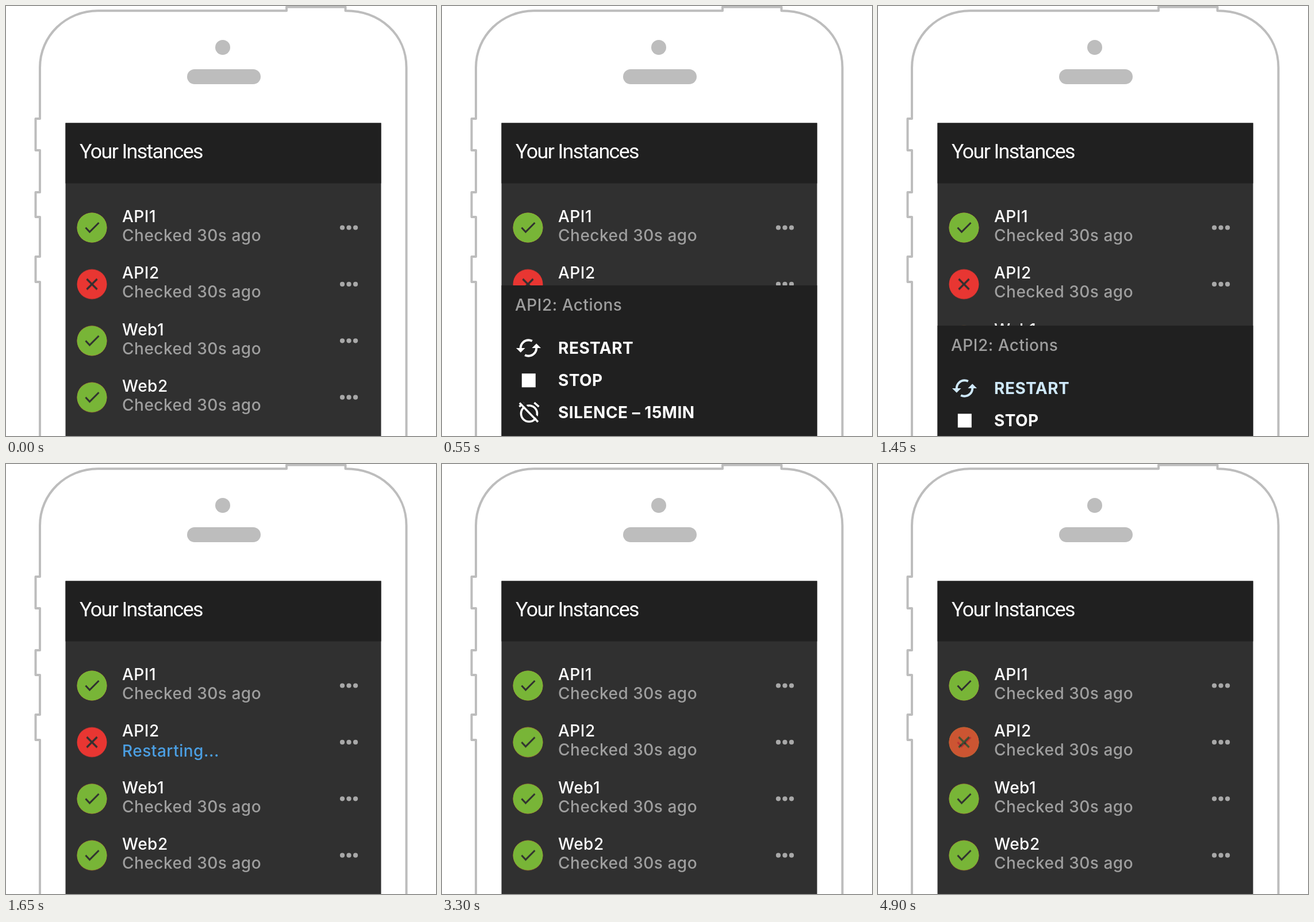
An HTML page with a canvas that plays this animation: 748 px wide and 748 px high, repeating every 4.95 s.

```html
<!DOCTYPE html>
<html lang="en">
<head>
<meta charset="utf-8">
<title>Your Instances</title>
<style>
html, body { margin: 0; width: 100%; height: 100%; overflow: hidden; background: #fff; }
canvas { display: block; width: 100vw; height: 100vh; }
</style>
</head>
<body>
<canvas id="stage" width="748" height="748"></canvas>
<script>
const SIZE = 748, LOOP = 4950, STEP = 50;
const SCREEN = { x: 103.5, y: 203.5, w: 549, h: 545 };
const BODY = '#303030', DARK = '#202020', WHITE = '#fff', GREY = '#9e9e9e';
const LINE = '#bdbdbd', GREEN = '#78b537', RED = '#e83632', BLUE = '#4b9fe3';
const SANS = 'Inter, "Open Sans", sans-serif';
const ROWS = ['API1', 'API2', 'Web1', 'Web2'];
const PANEL_Y = 486, TITLE = 'Your Instances', TITLE_TRACKING = -0.045;

const ctx = document.getElementById('stage').getContext('2d');
const layer = document.createElement('canvas');
layer.width = layer.height = 60;
const layerCtx = layer.getContext('2d');

const mix = (a, b, k) => a + (b - a) * k;
const clamp = v => Math.max(0, Math.min(1, v));

// Progress of a stepped change: 0 before it starts, 1 on its last step.
function stepped(time, start, count) {
  return clamp((Math.floor((time - start) / STEP) + 1) / count);
}

function backOut(t) {
  const s = 1.6, u = t - 1;
  return 1 + u * u * ((s + 1) * u + s);
}

function easeAway(t) {
  return mix(t * t * (3 - 2 * t), t, 0.1);
}

function text(str, x, y, color, weight = 450) {
  ctx.font = `${weight} 28px ${SANS}`;
  ctx.letterSpacing = '0.5px';
  ctx.fillStyle = color;
  ctx.fillText(str, x, y);
}

function dot(c, x, y, r, color) {
  c.fillStyle = color;
  c.beginPath();
  c.arc(x, y, r, 0, Math.PI * 2);
  c.fill();
}

function stroke(c, points, width, color) {
  c.strokeStyle = color;
  c.lineWidth = width;
  c.beginPath();
  points.forEach(([x, y]) => c.lineTo(x, y));
  c.stroke();
}

// The narrowest face at hand, sized to the header.
function pickTitleFont() {
  ctx.letterSpacing = '0px';
  const font = (name, size) => `extra-condensed 400 ${size}px "${name}", sans-serif`;
  const faces = ['Noto Sans', 'Open Sans', 'Roboto'].map(name => {
    ctx.font = font(name, 100);
    return { name, width: ctx.measureText(TITLE).width };
  });
  const best = faces.sort((a, b) => a.width - b.width)[0];
  const size = Math.min(56, 214 / (best.width / 100 + TITLE.length * TITLE_TRACKING));
  return { font: font(best.name, size), spacing: `${TITLE_TRACKING * size}px`, size };
}
const titleFont = pickTitleFont();

function drawPhone() {
  ctx.strokeStyle = LINE;
  ctx.lineWidth = 4;
  ctx.lineJoin = 'round';
  ctx.beginPath();
  ctx.moveTo(59, SIZE + 4);
  for (const [top, bottom] of [[436, 480], [324, 367], [196, 251]]) {
    ctx.lineTo(59, bottom);
    ctx.lineTo(51.5, bottom);
    ctx.lineTo(51.5, top);
    ctx.lineTo(59, top);
  }
  ctx.lineTo(59, 107);
  ctx.bezierCurveTo(59, 52, 104, 8.3, 160, 8.3);
  ctx.lineTo(488, 8.3);
  ctx.lineTo(488, 1.8);
  ctx.lineTo(590.5, 1.8);
  ctx.lineTo(590.5, 8.3);
  ctx.bezierCurveTo(651, 8.3, 696.5, 50, 696.5, 107);
  ctx.lineTo(696.5, SIZE + 4);
  ctx.stroke();
  ctx.lineJoin = 'miter';

  dot(ctx, 377, 72, 13, LINE);
  ctx.beginPath();
  ctx.roundRect(315, 110, 128, 26, 13);
  ctx.fill();
}

function drawHeader() {
  ctx.fillStyle = DARK;
  ctx.fillRect(SCREEN.x, SCREEN.y, SCREEN.w, 105);
  ctx.font = titleFont.font;
  ctx.letterSpacing = titleFont.spacing;
  ctx.fillStyle = WHITE;
  ctx.fillText(TITLE, 128, 252 + titleFont.size * 0.357);
}

function badge(y, ok, alpha = 1) {
  if (alpha <= 0) return;
  const c = layerCtx;
  c.setTransform(1, 0, 0, 1, 0, 0);
  c.clearRect(0, 0, 60, 60);
  c.translate(29.5, 29.5);
  dot(c, 0, 0, 26, ok ? GREEN : RED);
  if (ok) {
    stroke(c, [[-11, 0], [-4, 7.5], [12, -8.5]], 3, BODY);
  } else {
    stroke(c, [[-9, -9], [9, 9]], 3.2, BODY);
    stroke(c, [[9, -9], [-9, 9]], 3.2, BODY);
  }
  ctx.globalAlpha = alpha;
  ctx.drawImage(layer, 120, y - 29.5);
  ctx.globalAlpha = 1;
}

function drawRow(name, index, { recovered = 1, failing = 0, restarting = 0 }) {
  const y = 385.5 + index * 98.4;
  badge(y, false);
  badge(y, true, recovered);
  badge(y, false, failing);
  text(name, 202, y - 9.5, WHITE, 500);
  ctx.globalAlpha = 1 - restarting;
  text('Checked 30s ago', 202, y + 23.5, GREY);
  ctx.globalAlpha = restarting;
  text('Restarting...', 202, y + 25.5, BLUE);
  ctx.globalAlpha = 1;
  for (const x of [585, 596.5, 608]) dot(ctx, x, y, 4.1, '#a8a8a8');
}

function refreshIcon(x, y, color) {
  ctx.save();
  ctx.translate(x, y);
  ctx.scale(1.96, 1.96);
  ctx.strokeStyle = ctx.fillStyle = color;
  ctx.lineWidth = 2;
  for (let i = 0; i < 2; i++) {
    ctx.beginPath();
    ctx.arc(0, 0, 7, Math.PI, Math.PI * 1.5 + 0.48);
    ctx.stroke();
    ctx.beginPath();
    ctx.moveTo(-11, 0);
    ctx.lineTo(-3, 0);
    ctx.lineTo(-7, 4);
    ctx.fill();
    ctx.rotate(Math.PI);
  }
  ctx.restore();
}

function silenceIcon(x, y) {
  ctx.save();
  ctx.translate(x, y);
  ctx.strokeStyle = WHITE;
  ctx.lineWidth = 3.6;
  ctx.beginPath();
  ctx.arc(0, 2, 14, 0, Math.PI * 2);
  ctx.stroke();
  stroke(ctx, [[9, -17], [17, -10]], 3.6, WHITE);
  stroke(ctx, [[-9, -17], [-17, -10]], 3.6, WHITE);
  stroke(ctx, [[-14, -19], [19, 14]], 4, DARK);
  stroke(ctx, [[-16.5, -16.5], [15.5, 16.5]], 3.4, WHITE);
  ctx.restore();
}

function drawPanel(top, glow) {
  if (top >= SIZE) return;
  ctx.fillStyle = DARK;
  ctx.fillRect(SCREEN.x, top, SCREEN.w, SIZE - top);
  const tint = `rgb(${mix(255, 206, glow)}, ${mix(255, 232, glow)}, ${mix(255, 250, glow)})`;
  text('API2: Actions', 127, top + 44, GREY);
  text('RESTART', 202, top + 119, tint, 650);
  text('STOP', 202, top + 175, WHITE, 650);
  text('SILENCE – 15MIN', 202, top + 231, WHITE, 650);
  refreshIcon(150.5, top + 109, tint);
  ctx.fillStyle = WHITE;
  ctx.fillRect(138.8, top + 153.3, 24, 24);
  silenceIcon(151.5, top + 221);
}

function draw(time) {
  const opened = backOut(stepped(time, 200, 8));
  const leaving = stepped(time, 1400, 6);
  const glow = stepped(time, 1050, 4);
  const recovered = 1 - (1 - stepped(time, 3150, 4)) ** 2;
  const failing = stepped(time, 4800, 4);
  const restarting = clamp((leaving * 6 - 2) / 4) * (1 - recovered);
  const shown = time < 200 ? 0 : opened - easeAway(leaving);

  ctx.fillStyle = WHITE;
  ctx.fillRect(0, 0, SIZE, SIZE);
  drawPhone();
  ctx.fillStyle = BODY;
  ctx.fillRect(SCREEN.x, SCREEN.y, SCREEN.w, SCREEN.h);
  drawHeader();
  ROWS.forEach((name, i) => {
    drawRow(name, i, name === 'API2' ? { recovered, failing, restarting } : {});
  });
  drawPanel(Math.round(mix(SIZE, PANEL_Y, shown)), glow);
}

const start = performance.now();
function tick() {
  draw((performance.now() - start) % LOOP);
  requestAnimationFrame(tick);
}
tick();
</script>
</body>
</html>
```
